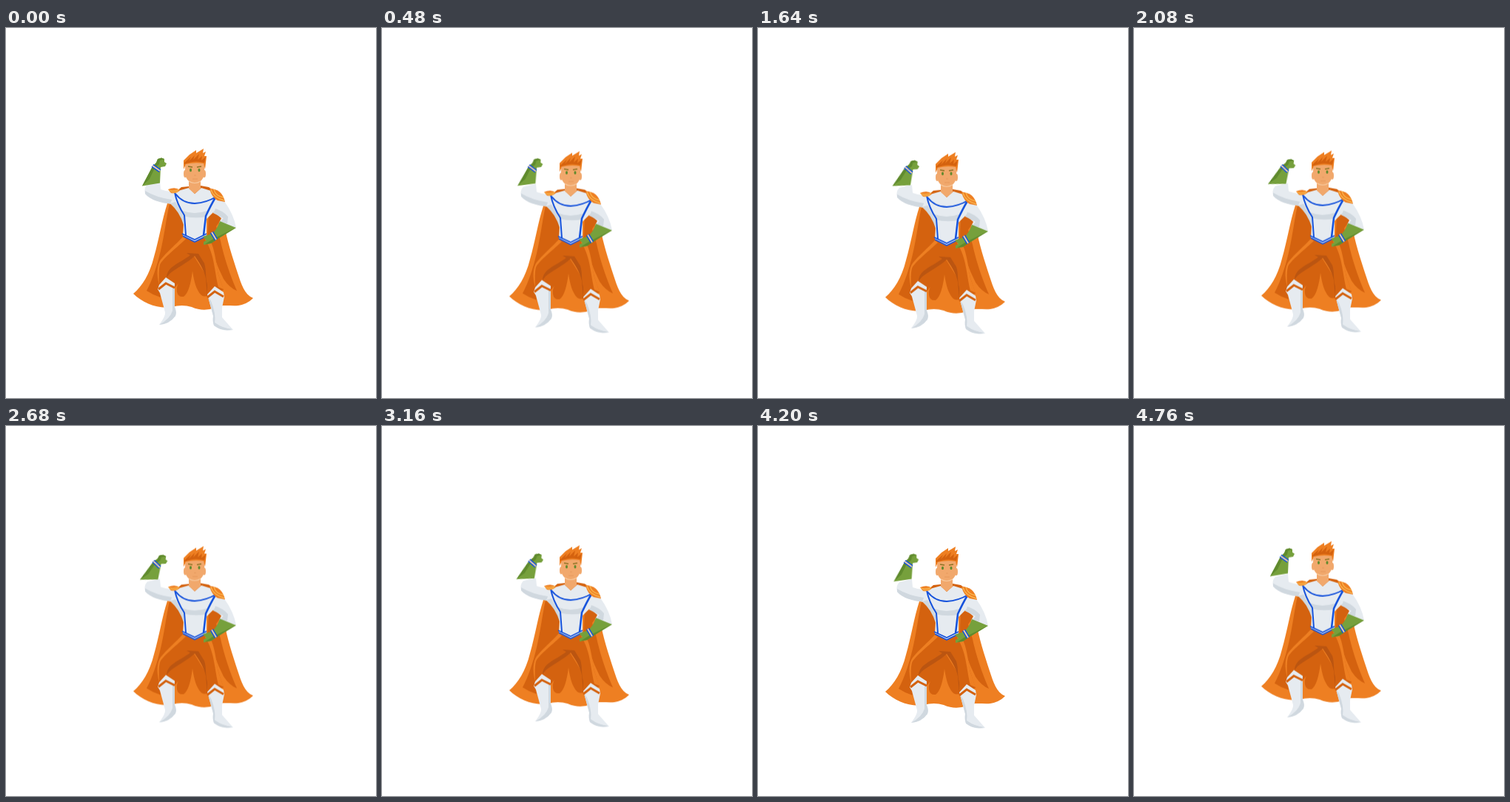
Write an HTML page that moves like this. It is 500 px wide and 500 px high and loops after 4.8 s.

```html
<!DOCTYPE html>
<html lang="en">
<head>
<meta charset="utf-8">
<title>Hero</title>
<style>
  html, body { margin: 0; width: 100%; height: 100%; overflow: hidden; background: #fff; }
  svg { display: block; width: 100vw; height: 100vh; }
  #forearm { transform-origin: 214px 192px; }
  .orange { fill: #ee7f22; }
  .rust { fill: #d4620f; }
  .brown { fill: #bb5511; }
  .white { fill: #e6ebf0; }
  .grey { fill: #d0d8df; }
  .skin { fill: #f1a86c; }
  .green { fill: #76a03c; }
  .moss { fill: #5f8a2d; }
  .line { fill: none; stroke: #1552dc; stroke-width: 2; }
  .gold { stroke: #f9b64f; stroke-width: 1.3; }
  .cuff { stroke: #d4620f; stroke-width: 3; }
  .band { stroke-width: 5; }
  .cream { stroke: #f3d3a8; stroke-width: 1.8; }
</style>
</head>
<body>
<svg viewBox="0 0 500 500">
  <g id="hero">
    <g id="cape">
      <path class="orange" d="M218 237C211 258 207 285 200 309C194 333 184 349 172 359C185 372 206 380 224 377Q238 373 251 377Q267 384 282 378C291 373 303 376 314 375Q326 373 334 365C322 360 318 346 313 331C306 309 298 286 295 264L288 240Z"/>
      <path class="rust" d="M221 237L242 258V287L214 308L207 321V349L209 364Q199 361 190 355C198 340 204 322 209 301C214 280 217 255 221 237Z"/>
      <path class="rust" d="M274 252L289 248L291 258L284 268L290 288C293 303 301 330 312 355Q302 351 294 339L287 324L272 285Z"/>
      <path class="rust" d="M219 330L252 305L272 337L273 361Q269 364 264 361C257 354 254 342 252 328C250 345 246 359 240 363Q232 364 231 356Q230 351 233 345L228 351Z"/>
    </g>
    <g id="legs">
      <path class="rust" d="M240 282L255 290L271 282C281 294 283 316 287 333L294 354L273 361L270 338C267 324 260 316 255 306C247 315 229 324 221 333L228 348L207 349C204 334 203 321 209 313C217 303 230 292 239 282Z"/>
      <path class="orange" d="M239 282L243 285C233 295 211 312 208 320Q206 328 207 347C203 332 204 320 209 313C217 303 230 292 239 282Z"/>
      <path class="orange" d="M269 286L273 282C282 294 284 318 287 333L294 353L287 350C282 332 282 305 269 286Z"/>
      <path class="brown" d="M244 304L260 305L268 318C271 327 269 335 272 347V361L270 338C267 324 260 316 255 308C247 316 229 325 221 332L217 337C218 322 233 319 249 307Z"/>
      <path class="white" d="M205 353L207 347L216 337L228 345V377Q231 384 229 389Q221 400 207 401Q216 389 215 384L208 358Z"/>
      <path class="grey" d="M225 349L228 347V377Q231 384 229 389Q221 400 207 401Q222 393 225 382Z"/>
      <path class="line cuff" d="M206 353L216 345L228 351"/>
      <path class="white" d="M272 360L282 349L294 357L295 363L292 378V391L307 408Q293 411 281 402Q279 397 280 389L274 367Z"/>
      <path class="grey" d="M273 363L277 369Q284 386 282 398Q293 406 306 407Q293 411 281 402Q279 397 280 389Z"/>
      <path class="line cuff" d="M272 364L282 356L294 363"/>
    </g>
    <g id="torso">
      <path class="rust" d="M229 222L237 215L247 214L255 218L263 213L274 215L284 222L270 228H240Z"/>
      <path class="white" d="M233 220Q222 223 209 218L208 207L191 211Q186 216 188 224Q198 235 228 238Z"/>
      <path class="grey" d="M188 220Q203 229 224 232L227 238Q198 236 188 224Z"/>
      <path class="white" d="M281 226L295 234Q308 252 311 270L288 263L291 257L280 248Z"/>
      <path class="grey" d="M280 243Q294 247 300 255L299 264L289 263L294 257L280 250Z"/>
      <path class="white" d="M229 221L247 216L255 224L264 216L277 220L287 229L282 247L271 258V281L255 289L239 281L240 264Q236 247 222 237Z"/>
      <path class="grey" d="M239 247Q254 253 272 247L270 255Q255 258 239 254Z"/>
      <path class="grey" d="M229 235L240 255V266Q235 249 222 237Z"/>
      <path class="line" d="M229 224Q239 237 255 237Q271 236 284 228"/>
      <path class="line" d="M228 222Q231 238 241 253L243 280"/>
      <path class="line" d="M283 229Q277 239 270 254L267 280" style="stroke-width:2.5"/>
      <path class="line" d="M238 278L255 286L271 278M239 281L255 289L271 281" style="stroke-width:1.6"/>
      <path class="orange" d="M219 218Q229 214 235 219Q232 224 223 223Z"/>
      <path class="line gold" d="M220 219Q227 221 234 218M222 221Q228 223 233 220"/>
      <path class="orange" d="M275 217Q292 217 296 235L286 233Q278 229 275 217Z"/>
      <path class="line gold" d="M277 218Q280 229 295 233M281 218Q283 227 294 229"/>
    </g>
    <g id="hip-hand">
      <path class="green" d="M289 261L311 270L286 285L277 291L267 293V289L271 287L266 282L278 278Q285 273 289 261Z"/>
      <path class="moss" d="M310 270L286 285L277 291L269 292L280 285Z"/>
      <path class="line band" d="M278 276L284 286"/>
      <path class="line cream" d="M278 276L284 286"/>
    </g>
    <g id="head">
      <path class="skin" d="M247 204H263V217L255 224L247 217Z"/>
      <ellipse class="skin" cx="242" cy="197" rx="2" ry="5"/>
      <ellipse class="skin" cx="268" cy="197" rx="2" ry="5"/>
      <path class="skin" d="M242 181H268V198Q266 206 259 210H251Q244 206 242 198Z"/>
      <path d="M247 207Q255 212 263 207" fill="none" stroke="#f8cda3" stroke-width="1.2"/>
      <path class="orange" d="M240 191V179L248 171L257 165V169L267 163L266 169L270 167L268 173L271 173L269 191L267 183Q255 181 243 184Z"/>
      <path class="rust" d="M241 182L250 174L247 180L255 172L253 178L261 170L259 178L265 173L264 179L270 174L268 182Q255 178 241 184Z"/>
      <path d="M246 187L252 188M258 188L264 187" stroke="#8f7326" stroke-width="1.6"/>
      <ellipse class="moss" cx="249.500" cy="192" rx="1.500" ry="2.300"/>
      <ellipse class="moss" cx="261" cy="192" rx="1.500" ry="2.300"/>
      <path d="M254 199H257M252 204H259" stroke="#e29659" stroke-width=".8"/>
    </g>
    <g id="forearm">
      <path class="green" d="M184 213.500L198 187L203 182L205 177L210 175.500L214 177V181L217 183L215 187L209 188L208 209.500Z"/>
      <path class="moss" d="M184 213.500L198 187L203 182L205 177L210 175.500L214 177L208 179L207 184L201 189L194 204Z"/>
      <path class="line band" d="M198 186L208 193"/>
      <path class="line cream" d="M198 186L208 193"/>
    </g>
  </g>
</svg>
<script>
const RISE = "cubic-bezier(.61, 1, .88, 1)";
const SWAY = "cubic-bezier(.37, 0, .63, 1)";

// Each key is a share of the loop, a vertical offset and a rotation.
const key = (offset, y, turn = 0, easing = SWAY) =>
  ({ offset, easing, transform: `translateY(${y}px) rotate(${turn}deg)` });

const play = (id, ...keys) =>
  document.getElementById(id).animate(keys, { duration: 4800, iterations: Infinity });

play("hero", key(0, 0, 0, RISE), key(.24, 5.8), key(.67, -1.8), key(.85, .5), key(1, -7.4));
play("forearm", key(0, 0), key(.1, -2.7, 2), key(.5, -.3, 9), key(1, -3));
</script>
</body>
</html>
```
